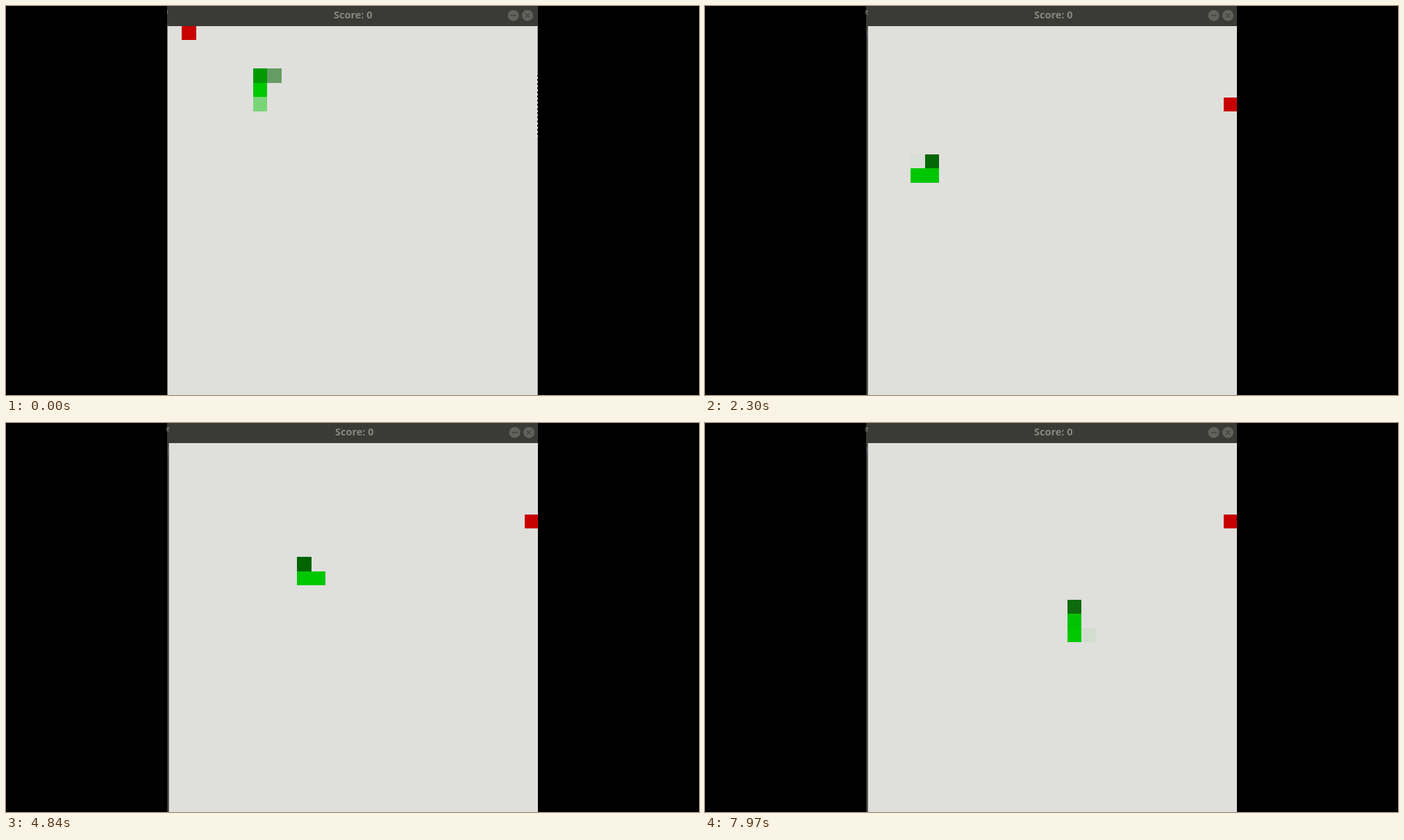
Animation, 998 px wide and 561 px high, one loop 8 s. Source, as an HTML page with a canvas:

```html
<!DOCTYPE html>
<html lang="en">
<head>
<meta charset="utf-8">
<title>Snake</title>
<style>
  html, body { margin: 0; width: 100%; height: 100%; overflow: hidden; background: #000; }
  canvas { display: block; }
</style>
</head>
<body>
<canvas id="stage" width="998" height="561"></canvas>
<script>
const LOOP = 8000, FADE = 100, CELL = 20.5, COLUMNS = 26;
const LEFT = 232, RIGHT = 766, HEIGHT = 561;
const DIRECTIONS = { L: [-1, 0], R: [1, 0], U: [0, -1], D: [0, 1] };

const stage = document.getElementById('stage').getContext('2d');
const buffer = document.createElement('canvas');
buffer.width = 998;
buffer.height = HEIGHT;
const ctx = buffer.getContext('2d');

function box(color, x, y, w, h) {
  ctx.fillStyle = color;
  ctx.fillRect(x, y, w, h);
}

function label(text, x, y, color, font = '14px "Noto Sans", sans-serif', align = 'left') {
  ctx.font = font;
  ctx.textAlign = align;
  ctx.textBaseline = 'middle';
  ctx.fillStyle = color;
  ctx.fillText(text, x, y);
}

function line(color, width, ...points) {
  ctx.strokeStyle = color;
  ctx.lineWidth = width;
  ctx.beginPath();
  for (let i = 0; i < points.length; i += 4) {
    ctx.moveTo(points[i], points[i + 1]);
    ctx.lineTo(points[i + 2], points[i + 3]);
  }
  ctx.stroke();
}

function disc(color, x, y, r) {
  ctx.fillStyle = color;
  ctx.beginPath();
  ctx.arc(x, y, r, 0, Math.PI * 2);
  ctx.fill();
}

function titleButton(x, y, cross) {
  disc('#62615b', x, y, 8);
  if (cross) line('#45443f', 1.5, x - 3, y - 3, x + 3, y + 3, x + 3, y - 3, x - 3, y + 3);
  else line('#45443f', 1.6, x - 4, y, x + 4, y);
}

function cell(game, [col, row], color) {
  const x = Math.round(game.x + col * CELL), y = Math.round(game.y + row * CELL);
  const right = Math.min(RIGHT, Math.round(game.x + (col + 1) * CELL));
  box(color, x, y, right - x, Math.round(game.y + (row + 1) * CELL) - y);
}

function drawGame(game, snake) {
  box('#3a3a36', LEFT, 0, RIGHT - LEFT, HEIGHT);
  const right = Math.min(RIGHT, game.x + COLUMNS * CELL);
  box('#dfdfdc', game.x, Math.round(game.y), right - game.x, HEIGHT);
  const middle = Math.round(game.y) - 15;
  label('Score: 0', game.x + 267.2, middle + .2, '#89887f', 'bold 14.5px "Noto Sans", sans-serif', 'center');
  titleButton(game.x + 498.1, middle - .3, false);
  titleButton(game.x + 518.5, middle - .3, true);
  game.edge();
  cell(game, game.apple, '#c80000');
  snake.forEach((pos, i) => cell(game, pos, i === snake.length - 1 ? '#006400' : '#00c800'));
}

function drawDesktop() {
  const mono = '15px "Noto Sans Mono", monospace';
  box('#484955', LEFT, 0, RIGHT - LEFT, HEIGHT);
  label('Edit  View  Navigate  Code  Refactor  Run  Tools  VCS  Window  Help', 234, 13, '#bbb');
  label('snake  >  snake.py', 240, 40, '#ccc');
  label('snake.py', 254, 71, '#d5d5d5');
  label('Terminal', 235, 490, '#ccc');
  label('ValueError: Sample larger than population or is negative', 265, 540, '#ddd', mono);
  label('Process finished with exit code 1', 265, 560, '#ddd', mono);
  disc('#e8e0c0', 318, 411, 5);

  box('#4c4b50', 348, 60, 418, 465);
  box('#45444a', 348, 60, 418, 42);
  box('#e6e6e6', 550, 102, 216, 423);
  line('#ddd', 2, 376, 75, 369, 81, 369, 81, 376, 87);
  box('#bbb', 468, 76, 10, 10);
  label('Home', 484, 81, '#bbb');
  label('Videos', 552, 81, '#eee', 'bold 14px "Noto Sans", sans-serif');
  const places = ['Recent', 'Home', 'Desktop', 'Documents', 'Downloads', 'Music',
    'Pictures', 'Videos', 'Trash', 'Computer', 'Other Locations'];
  places.forEach((name, i) => {
    const y = 122 + i * 32.7 + Math.max(0, i - 8) * 9.5;
    const color = name === 'Videos' ? '#a8694f' : '#d8d7d3';
    ctx.strokeStyle = color;
    ctx.lineWidth = 2;
    ctx.strokeRect(362, y - 6, 12, 12);
    label(name, 400, y, color);
  });
  [[602, 'movie'], [695, 'movie.mux']].forEach(([x, ending]) => {
    box('#a9a9a7', x - 17, 124, 35, 48);
    ['kazam_', 'fdgermby.', ending].forEach((text, i) =>
      label(text, x, 185 + i * 17.5, '#444', '15px "Noto Sans", sans-serif', 'center'));
  });
}

const firstGame = {
  x: 232.6, y: 28.8, apple: [1, 0],
  edge() {
    box('#777', LEFT, 6, 1, 5);
    box('#222', 765, 100, 1, 88);
    for (let y = 102; y < 188; y += 6) box('#ddd', 765, y, 1, 3);
  }
};
const secondGame = {
  x: 234.6, y: 29.2, apple: [25, 5],
  edge() {
    box('#55566a', 233, 34, 1, 11);
    label('e', 230, 9, '#8a8a86', '10px "Noto Sans", sans-serif');
  }
};

// Start time of a move, interpolated between [move, time] anchors
function moveTime(move, anchors) {
  let i = 1;
  while (i < anchors.length - 1 && move > anchors[i][0]) i++;
  const [m0, t0] = anchors[i - 1], [m1, t1] = anchors[i];
  return t0 + (t1 - t0) * (move - m0) / (m1 - m0);
}

function addMoves(game, snake, moves, anchors) {
  [...moves].forEach((letter, i) => {
    const [col, row] = snake[snake.length - 1], [dx, dy] = DIRECTIONS[letter];
    const pose = snake = [...snake.slice(1), [col + dx, row + dy]];
    scenes.push({ start: moveTime(i, anchors), draw: () => drawGame(game, pose) });
  });
}

const startOne = [[6, 5], [6, 4], [6, 3]];
const startTwo = [[6, 7], [5, 7], [4, 7]];
const scenes = [{ start: -1000, draw: () => drawGame(firstGame, startOne) }];
addMoves(firstGame, startOne, 'RRURRULLLLU', [[0, -53], [10, 1063]]);
scenes.push({ start: 1163, draw: drawDesktop });
scenes.push({ start: 1285, draw: () => drawGame(secondGame, startTwo) });
addMoves(secondGame, startTwo,
  'LD' + 'LDRDRURDDRUL' + 'LDDRDRURURURRULU' + 'RDRURDDRD' + 'DRURDLDLDRRRULLUU',
  [[0, 1405], [1, 1525], [2, 1635], [13, 2885], [29, 4738], [38, 5830], [55, 7877]]);

function paint(scene, alpha) {
  ctx.save();
  box('#000', 0, 0, 998, HEIGHT);
  ctx.beginPath();
  ctx.rect(LEFT - 1, 0, RIGHT - LEFT + 1, HEIGHT);
  ctx.clip();
  scene.draw();
  ctx.restore();
  stage.globalAlpha = alpha;
  stage.drawImage(buffer, 0, 0);
}

function frame() {
  const time = performance.now() % LOOP;
  let i = scenes.length - 1;
  while (scenes[i].start > time) i--;
  paint(scenes[i - 1], 1);
  paint(scenes[i], Math.min(1, (time - scenes[i].start) / FADE));
  requestAnimationFrame(frame);
}
frame();
</script>
</body>
</html>
```
